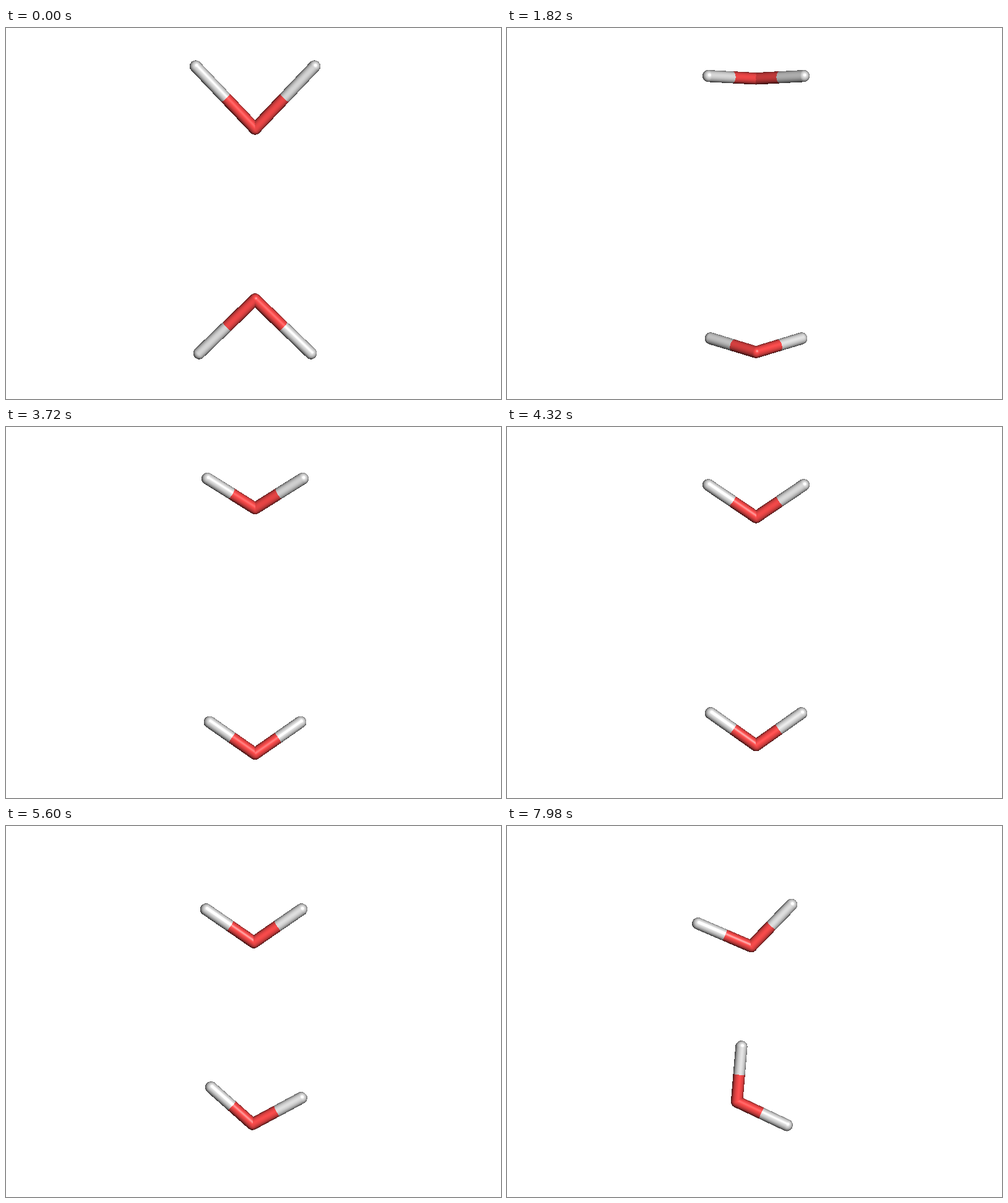
An HTML page with a canvas for the animation above (8000 ms loop, 800 px wide and 600 px high).

```html
<!DOCTYPE html>
<html lang="en">
<head>
<meta charset="utf-8">
<title>Two water molecules</title>
<style>
  html, body { margin: 0; width: 100%; height: 100%; overflow: hidden; background: #fff; }
  canvas { display: block; }
</style>
</head>
<body>
<canvas id="stage" width="800" height="600"></canvas>
<script>
const W = 800, H = 600, LOOP = 8000, STEP = 20, RADIUS = 9.7;
const OXYGEN = [255, 76, 76], HYDROGEN = [230, 230, 230];
const ctx = document.getElementById('stage').getContext('2d');
const image = ctx.createImageData(W, H);
const depth = new Float32Array(W * H);

const dot = (a, b) => a[0] * b[0] + a[1] * b[1] + a[2] * b[2];
const sub = (a, b) => [a[0] - b[0], a[1] - b[1], a[2] - b[2]];
const unit = a => a.map(v => v / Math.hypot(...a));

// Axes: x right, y down, z towards the viewer.
const LIGHT = unit([.4, -.4, 1]);
const HALF = unit([LIGHT[0], LIGHT[1], LIGHT[2] + 1]);

function plot(x, y, z, normal, color) {
  const i = y * W + x;
  if (z <= depth[i]) return;
  depth[i] = z;
  const diffuse = .14 + .45 * Math.max(0, normal[2]) + .45 * Math.max(0, dot(normal, LIGHT));
  const gloss = 95 * Math.max(0, dot(normal, HALF)) ** 55;
  for (let c = 0; c < 3; c++) image.data[i * 4 + c] = color[c] * diffuse + gloss;
}

// Rounded stick from oxygen o to hydrogen h, seen along the z axis.
function drawStick(o, h) {
  const axis = sub(h, o), len2 = dot(axis, axis), flat2 = len2 - axis[2] ** 2;
  const low = k => Math.floor(Math.min(o[k], h[k]) - RADIUS);
  const high = k => Math.ceil(Math.max(o[k], h[k]) + RADIUS);
  for (let y = low(1); y <= high(1); y++) {
    for (let x = low(0); x <= high(0); x++) {
      const from = [x + .5 - o[0], y + .5 - o[1], -o[2]];
      const along = dot(axis, from);
      const b = len2 * from[2] - along * axis[2];
      const c = len2 * (dot(from, from) - RADIUS ** 2) - along ** 2;
      const disc = b * b - flat2 * c;
      if (disc < 0) continue;
      let z = (-b + Math.sqrt(disc)) / flat2;
      const u = (along + z * axis[2]) / len2;
      let center = o.map((v, k) => v + axis[k] * u);
      if (u < 0 || u > 1) {
        center = u < 0 ? o : h;
        const rest = RADIUS ** 2 - (x + .5 - center[0]) ** 2 - (y + .5 - center[1]) ** 2;
        if (rest < 0) continue;
        z = center[2] + Math.sqrt(rest);
      }
      const normal = sub([x + .5, y + .5, z], center).map(v => v / RADIUS);
      plot(x, y, z, normal, u < .5 ? OXYGEN : HYDROGEN);
    }
  }
}

// (x, y) is the midpoint between the hydrogens, span half their distance,
// reach the distance to the oxygen; tilt leans it in depth, roll turns it in the plane.
function drawMolecule({ x, y, span, reach, tilt, roll, side }) {
  const rad = Math.PI / 180;
  const drop = reach * Math.cos(tilt * rad);
  const z = side * reach * Math.sin(tilt * rad);
  const cos = Math.cos(roll * rad), sin = Math.sin(roll * rad);
  const oxygen = [x - drop * sin, y + drop * cos, z];
  for (const s of [-span, span]) drawStick(oxygen, [x + s * cos, y + s * sin, 0]);
}

function drawScene(t) {
  const ease = (center, width) => 1 / (1 + Math.exp((center - t) / width));
  const stretch = Math.exp(-t / 120);                 // long bonds relax
  const flip = Math.exp(-t / 160);                    // oxygens swing apart
  const recoil = (1 + t / 120) * Math.exp(-t / 230);  // short push outwards
  const turn = ease(6024, 204);                       // lower molecule rolls over
  const settle = ease(6950, 220);                     // upper one answers

  drawMolecule({
    x: 402.5 - 18.3 * ease(5850, 120),
    y: 77.6 - 15.6 * recoil + 73 * ease(4950, 500) - 8 * settle,
    span: 77 + 19 * stretch,
    reach: 54 + 51 * stretch,
    tilt: 89 - 73 * flip - 79 * ease(3150, 430),
    roll: -11.5 * settle,
    side: -1,
  });
  drawMolecule({
    x: 402.5 + 16 * turn - 3 * settle,
    y: 508 + 19 * recoil - 105 * ease(4600, 1000) + 14 * settle,
    span: 73.3 + 17 * stretch,
    reach: 52 + 38.5 * stretch,
    tilt: 75 + 89.6 * flip - 87 * ease(3053, 616),
    roll: 60 * turn,
    side: 1,
  });
}

function render(now) {
  let t = Math.floor(now % LOOP / STEP) * STEP;
  if (t < 2 * STEP) t = 0;
  image.data.fill(255);
  depth.fill(-1e6);
  drawScene(t);
  ctx.putImageData(image, 0, 0);
}

const start = performance.now();
function tick() {
  render(performance.now() - start);
  requestAnimationFrame(tick);
}
tick();
</script>
</body>
</html>
```
